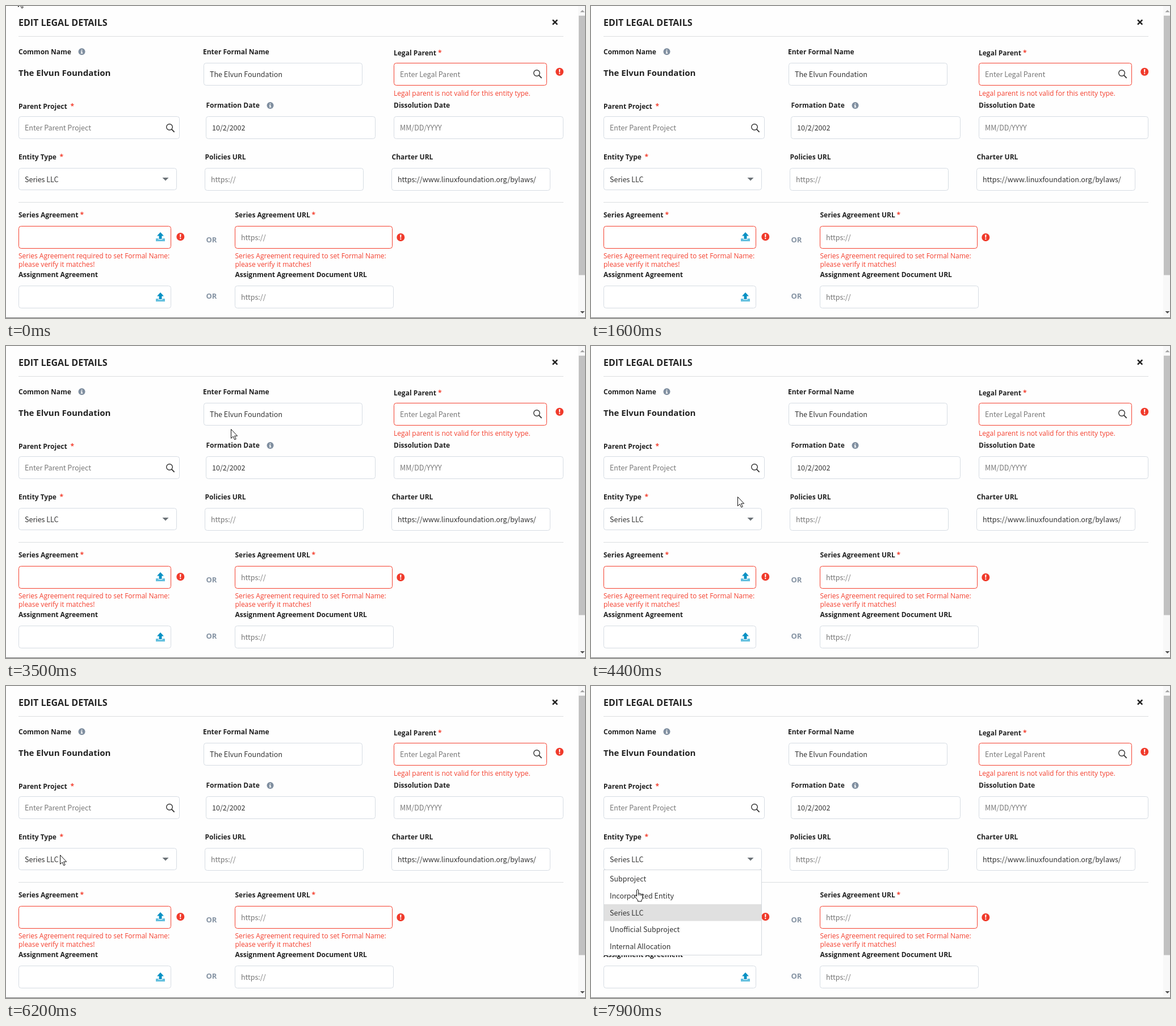
Animation, 1020 px wide and 549 px high, one loop 8 s. Source, as an HTML page:

```html
<!DOCTYPE html>
<html lang="en">
<head>
<meta charset="utf-8">
<title>Edit legal details</title>
<style>
html, body { margin: 0; width: 100%; height: 100%; overflow: hidden; background: #fefefe; }
svg { display: block; width: 1020px; height: 549px; }
text { white-space: pre; }
.label { font: 700 12px 'Open Sans', sans-serif; fill: #222; }
.title { font: 700 16px 'Open Sans', sans-serif; fill: #222; }
.name { font: 700 15px 'Open Sans', sans-serif; fill: #222; }
.or { font: 700 13px 'Open Sans', sans-serif; fill: #8593a3; }
.star { font: 700 12px 'Open Sans', sans-serif; fill: #f4402f; }
.error { font: 400 12px 'Open Sans', sans-serif; fill: #f4402f; }
.value, .hint { font: 400 12.53px 'Noto Sans CJK JP', 'Noto Sans CJK SC', 'Noto Sans CJK', sans-serif; fill: #333; }
.hint { fill: #777; }
.box { fill: #fff; stroke: #d6dce3; }
.bad { stroke: #f4402f; }
.rule { stroke: #dcdee0; }
</style>
</head>
<body>
<svg id="stage" viewBox="0 0 1020 549" xmlns="http://www.w3.org/2000/svg"></svg>
<script>
const LOOP = 8000, STEP = 100;
const MENU_OPEN = 7400, HAND_FROM = 7600;
const stage = document.getElementById('stage');

function add(parent, tag, attrs, content) {
  const el = document.createElementNS('http://www.w3.org/2000/svg', tag);
  for (const key in attrs) el.setAttribute(key, attrs[key]);
  if (content !== undefined) el.textContent = content;
  parent.appendChild(el);
  return el;
}
const rect = (x, y, width, height, attrs, parent = stage) =>
  add(parent, 'rect', { x, y, width, height, ...attrs });
const path = (d, attrs, parent = stage) => add(parent, 'path', { d, ...attrs });
const text = (cls, x, y, str, parent = stage) => add(parent, 'text', { class: cls, x, y }, str);
const group = (x, y) => add(stage, 'g', { transform: `translate(${x} ${y})` });

function field(x, y, w, str = '', cls = 'hint', bad = false, h = 39) {
  rect(x, y, w, h, { rx: 4, class: bad ? 'box bad' : 'box' });
  text(cls, x + 10.5, y + 24.5, str);
}

function infoIcon(x, y) {
  const g = group(x, y);
  add(g, 'circle', { r: 6, fill: '#7f8e9f' });
  path('M-1.7-.9H.9V2.2H1.8V3.5H-1.8V2.2H-.9V.4H-1.7ZM-.9-3.6H.9V-1.9H-.9Z', { fill: '#fff' }, g);
}

function alertIcon(x, y) {
  const g = group(x, y);
  add(g, 'circle', { r: 7, fill: '#f03a2b' });
  path('M-1.2-4.4H1.2L.8 1H-.8ZM-1 2.1H1V4.1H-1Z', { fill: '#fff' }, g);
}

function searchIcon(x, y) {
  const g = group(x, y);
  add(g, 'circle', { cx: 6, cy: 6, r: 5.3, fill: 'none', stroke: '#333', 'stroke-width': 1.4 });
  path('M9.8 9.8L14.6 14.8', { stroke: '#333', 'stroke-width': 1.8 }, g);
}

function uploadIcon(x, y) {
  const g = group(x, y);
  path('M0 11H4.5V13H11.5V11H16V16H0Z', { fill: '#62bfde' }, g);
  path('M8 0L14 6.5H10.5V12H5.5V6.5H2Z', { fill: '#0791c4' }, g);
}

function drawForm() {
  text('title', 22, 35, 'EDIT LEGAL DETAILS');
  path('M963 24.3L971.3 32.6M971.3 24.3L963 32.6', { stroke: '#222', 'stroke-width': 2.5 });
  for (const y of [53.5, 345.5]) path(`M22 ${y}H982`, { class: 'rule' });

  const labels = [
    [22, 85, 'Common Name'], [347, 85, 'Enter Formal Name'], [683, 87, 'Legal Parent', 761],
    [22, 181, 'Parent Project', 113.5], [352.5, 179, 'Formation Date'], [683, 179, 'Dissolution Date'],
    [22, 270, 'Entity Type', 94.5], [350.5, 270, 'Policies URL'], [679.5, 270, 'Charter URL'],
    [22, 372, 'Series Agreement', 130.5], [403.5, 372, 'Series Agreement URL', 538.5],
    [22, 477, 'Assignment Agreement'], [403.5, 477, 'Assignment Agreement Document URL']
  ];
  for (const [x, y, str, star] of labels) {
    text('label', x, y, str);
    if (star) text('star', star, y, '*');
  }
  text('name', 22, 123, 'The Elvun Foundation');

  field(348.5, 100.5, 279, 'The Elvun Foundation', 'value');
  field(683.5, 100.5, 269, 'Enter Legal Parent', 'hint', true);
  field(22.5, 194.5, 283, 'Enter Parent Project');
  field(352.5, 194.5, 298, '10/2/2002', 'value');
  field(683.5, 194.5, 298, 'MM/DD/YYYY');
  field(22.5, 285.5, 278, 'Series LLC', 'value', false, 38);
  field(350.5, 285.5, 279, 'https://');
  field(679.5, 285.5, 279, 'https://www.linuxfoundation.org/bylaws/', 'value');
  field(22.5, 387.5, 268, '', 'hint', true);
  field(403.5, 387.5, 277, 'https://', 'hint', true);
  field(22.5, 492.5, 268);
  field(403.5, 492.5, 279, 'https://');

  text('error', 683, 158, 'Legal parent is not valid for this entity type.');
  for (const x of [22, 403.5]) {
    text('error', x, 444, 'Series Agreement required to set Formal Name:');
    text('error', x, 459, 'please verify it matches!');
  }
  text('or', 352.4, 416, 'OR');
  text('or', 352.4, 515, 'OR');

  infoIcon(133.5, 80.3);
  infoIcon(465.5, 175);
  searchIcon(929, 112);
  searchIcon(282, 207);
  alertIcon(975.2, 115.7);
  alertIcon(307.3, 406);
  alertIcon(695.3, 407);
  uploadIcon(264, 398);
  uploadIcon(264, 504);
  path('M275.5 302H286.5L281 307.5Z', { fill: '#6c7278' });
}

function drawMenu() {
  const g = add(stage, 'g', {});
  rect(22.5, 323.5, 278, 150, { fill: '#fff', stroke: '#d3d8dd' }, g);
  rect(23, 384, 277, 29.5, { fill: '#e0e0e0' }, g);
  ['Subproject', 'Incorporated Entity', 'Series LLC', 'Unofficial Subproject', 'Internal Allocation']
    .forEach((str, i) => text('value', 33, Math.round(344 + i * 29.8), str, g));
  return g;
}

function drawScrollbar() {
  rect(1008, 0, 12, 549, { fill: '#f8f8f8' });
  rect(1009, 17, 11, 456.5, { fill: '#c1c1c1' });
  path('M1011.5 11L1015.5 7L1019.5 11Z', { fill: '#a3a3a3' });
  path('M1011.5 537L1015.5 541L1019.5 537Z', { fill: '#505050' });
  rect(0, 548, 1020, 1, { fill: '#7b7b7b' });
}

drawForm();
const menu = drawMenu();
drawScrollbar();

const ink = { fill: '#fff', stroke: '#111', 'stroke-linejoin': 'round' };
const arrow = path('M.5.5V16.5L4.2 13.1L6.8 18.8L9.2 17.7L6.6 12.2H11.6Z', ink);
const hand = path('M4.5 13V2Q6.1-.6 7.7 2V8Q9.3 7 10.3 8.6Q11.8 7.8 12.7 9.3' +
  'Q15 8.9 15 11.3V15Q15 18 13 20V22H6.5V20Q3 15.5.7 12.5Q.8 10.4 3 11.4Z' +
  'M7.7 8V11.5M10.3 8.6V11.5M12.7 9.3V12', ink);

// time, x, y of the pointer
const route = [
  [0, 21, -15], [200, 21, -15], [700, 44, 82], [800, 44, 82], [1100, 112, 92], [1200, 112, 92],
  [1400, 64, 92], [1500, 64, 92], [1900, 310, 142], [2400, 616, 142], [2500, 658, 103],
  [2600, 658, 103], [2900, 952, 112], [3500, 396, 146], [3600, 396, 146], [4000, 88, 172],
  [4300, 160, 250], [4500, 355, 280], [4600, 355, 280], [4900, 445, 272], [5200, 703, 236],
  [5500, 850, 262], [5800, 758, 319], [6200, 95, 297], [6300, 79, 300], [6600, 237, 305],
  [6700, 237, 305], [6800, 250.5, 298], [7500, 250.5, 298], [7600, 200, 327], [7700, 140, 346],
  [7900, 76, 357]
];
// spans in which the pointer is a text caret and cannot be seen
const hidden = [[1600, 1900], [2700, 3200], [4900, 5200], [5600, 5800]];

function pointerAt(t) {
  let i = 0;
  while (i < route.length - 2 && t >= route[i + 1][0]) i++;
  const [t0, x0, y0] = route[i], [t1, x1, y1] = route[i + 1];
  const k = Math.min(1, (t - t0) / (t1 - t0));
  return [x0 + (x1 - x0) * k, y0 + (y1 - y0) * k];
}

const show = (el, on) => el.setAttribute('visibility', on ? 'visible' : 'hidden');

function render(ms) {
  const t = Math.floor((ms % LOOP) / STEP) * STEP;
  const [x, y] = pointerAt(t);
  const seen = !hidden.some(([from, to]) => t >= from && t < to);
  const place = `translate(${Math.round(x)} ${Math.round(y)})`;
  arrow.setAttribute('transform', place);
  hand.setAttribute('transform', place);
  show(menu, t >= MENU_OPEN);
  show(arrow, seen && t < HAND_FROM);
  show(hand, t >= HAND_FROM);
}

const start = performance.now();
function tick() {
  render(performance.now() - start);
  requestAnimationFrame(tick);
}
tick();
</script>
</body>
</html>
```
